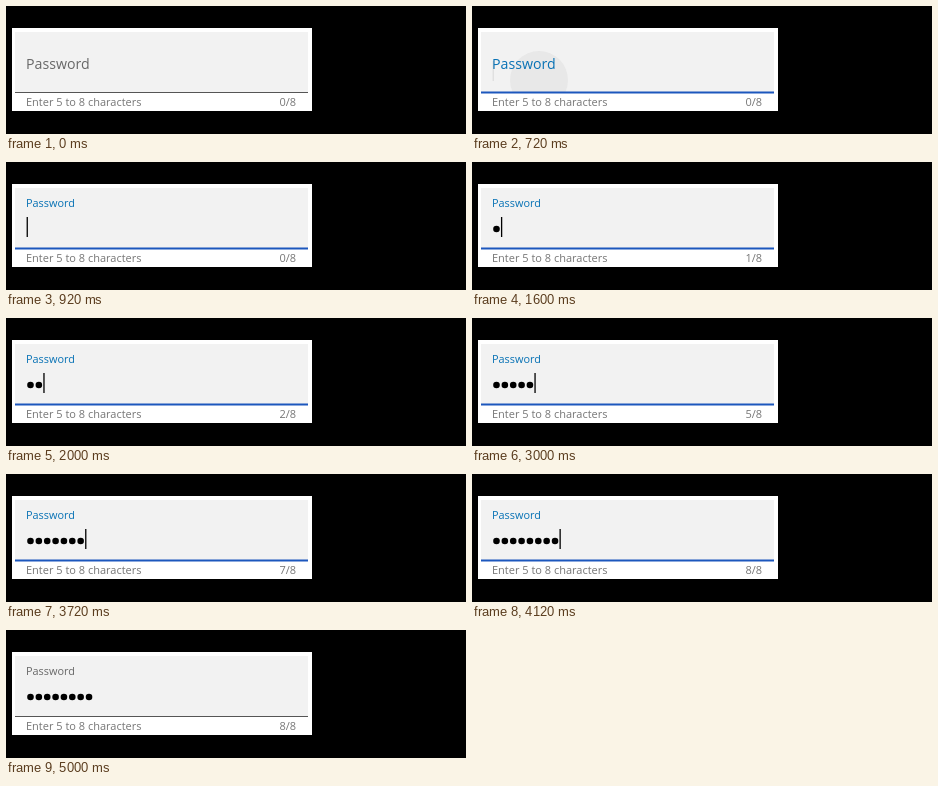
An HTML page for the animation above (5.12 s loop, 460 by 128 pixels).

```html
<!DOCTYPE html>
<html lang="en">
<head>
<meta charset="utf-8">
<title>Password field</title>
<style>
  html, body { margin: 0; width: 100%; height: 100%; overflow: hidden; background: #000; }
  svg { display: block; width: 460px; height: 128px; }
  text { font-family: "Open Sans", "Noto Sans", sans-serif; }
  .hint { font-size: 11px; fill: #767676; }
</style>
</head>
<body>
<svg viewBox="0 0 460 128">
  <defs>
    <clipPath id="fieldClip"><rect x="9" y="26" width="293" height="60"/></clipPath>
  </defs>
  <rect width="460" height="128"/>
  <rect x="6" y="22" width="300" height="83" fill="#fff"/>
  <rect x="9" y="26" width="293" height="60" fill="#f2f2f2"/>
  <g clip-path="url(#fieldClip)"><circle id="ripple" cx="67" cy="74" fill="#e8e8e8"/></g>
  <rect id="line" x="9" width="293"/>
  <text id="label" x="20">Password</text>
  <g id="dots"></g>
  <rect id="caret" y="55" width="1.3" height="20"/>
  <text class="hint" x="20" y="100">Enter 5 to 8 characters</text>
  <text class="hint" id="counter" x="290" y="100" text-anchor="end">0/8</text>
</svg>
<script>
const LOOP = 5120, FOCUS = 720, SETTLED = 920, BLUR = 5000;
const FLOAT_STEPS = [720, 800, 840, 920];
const KEY_TIMES = [1600, 1880, 2280, 2600, 2920, 3400, 3720, 4000];
const PITCH = 8.36;

const byId = id => document.getElementById(id);
const [ripple, line, label, dots, caret, counter] =
  ['ripple', 'line', 'label', 'dots', 'caret', 'counter'].map(byId);

function set(node, attributes) {
  for (const name in attributes) node.setAttribute(name, attributes[name]);
}

KEY_TIMES.forEach((_, i) => {
  const dot = document.createElementNS('http://www.w3.org/2000/svg', 'circle');
  set(dot, { cx: 24.5 + i * PITCH, cy: 67, r: 3.3 });
  dots.append(dot);
});

const mix = (from, to, p) => from + (to - from) * p;

// The label floats up in a few hard steps along an ease-out curve.
function floatProgress(t) {
  const step = FLOAT_STEPS.filter(time => time <= t).pop() ?? FOCUS;
  const p = (step - FOCUS) / (SETTLED - FOCUS);
  return 1 - (1 - p) ** 2;
}

function draw(t) {
  const focused = t >= FOCUS && t < BLUR;
  const typed = KEY_TIMES.filter(time => time <= t).length;
  const p = floatProgress(t);

  set(label, {
    y: mix(62.6, 45, p),
    'font-size': mix(14.2, 10.9, p),
    fill: focused ? '#0872b5' : '#686868'
  });
  set(line, focused
    ? { y: 85.5, height: 2, fill: '#1c57bd' }
    : { y: 86, height: 1, fill: '#555' });
  set(ripple, { r: mix(29, 100, p), opacity: focused ? 1 - p : 0 });
  set(caret, {
    x: 20.6 + typed * PITCH,
    opacity: !focused ? 0 : t < SETTLED ? 0.08 : 1
  });
  [...dots.children].forEach((dot, i) => set(dot, { opacity: i < typed ? 1 : 0 }));
  counter.textContent = typed + '/8';
}

const start = performance.now();
function tick() {
  draw((performance.now() - start) % LOOP);
  requestAnimationFrame(tick);
}
tick();
</script>
</body>
</html>
```
